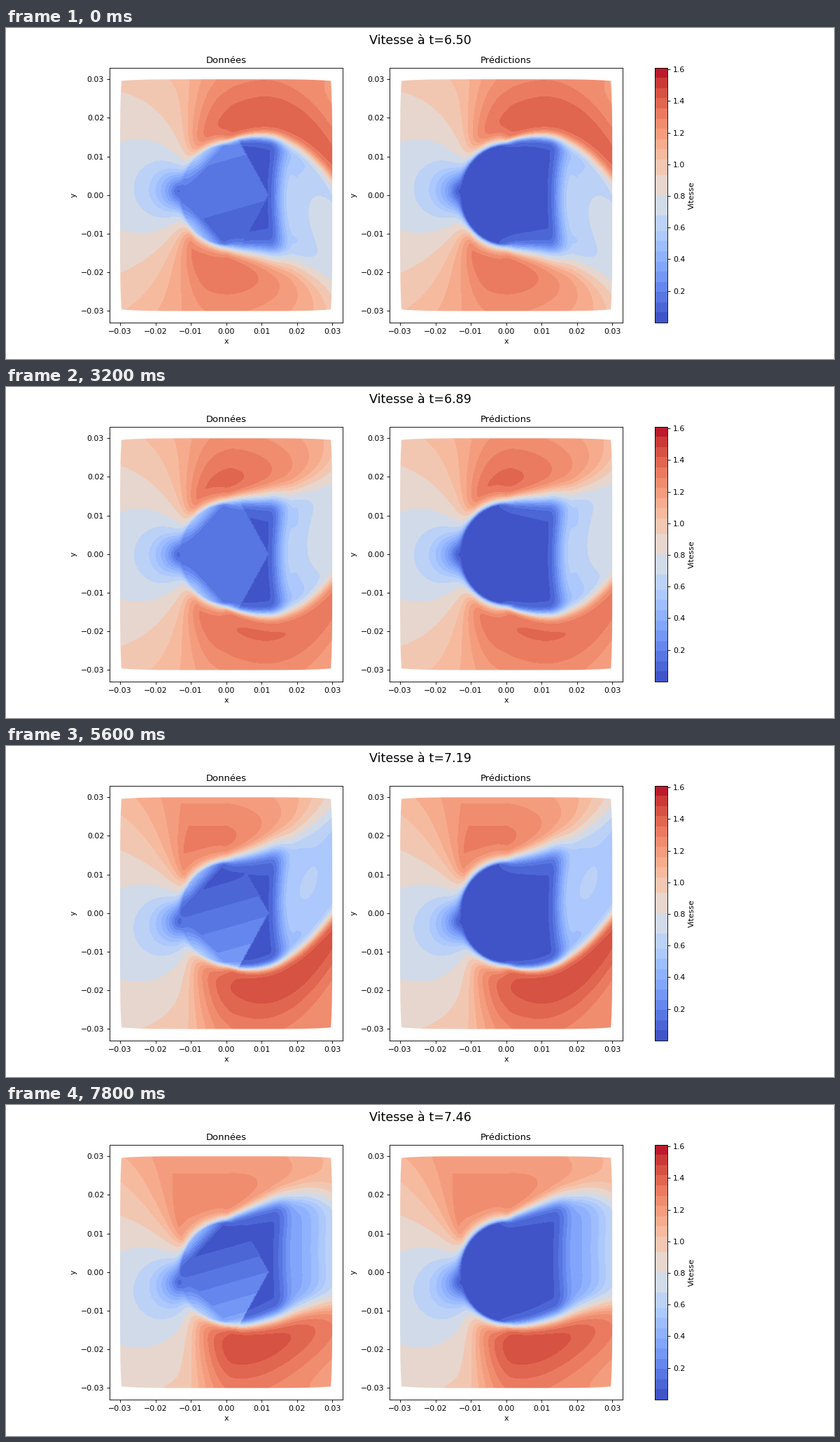
These frames come from a looping animation (1183 px wide and 473 px high, 8000 ms). A matplotlib script:

```python
import numpy as np
import matplotlib.pyplot as plt
from matplotlib.animation import FuncAnimation
from matplotlib.colors import BoundaryNorm, ListedColormap
from matplotlib.path import Path

FRAMES, INTERVAL = 40, 200
OMEGA = 0.996            # shedding phase advance per frame
T0, DT = 6.50, 0.02462   # displayed time
V_MAX = 1.61
RADIUS = 1.28            # cylinder radius, lengths in cm

plt.rcParams.update({"font.family": "DejaVu Sans", "font.size": 9.86})

axis = np.linspace(-3.02, 3.02, 203)
X, Y = np.meshgrid(axis, axis)
R = np.maximum(np.hypot(X, Y), 1e-6)
Z = (X + 1j * Y) * np.maximum(R, 1.2) / R
Z[np.abs(Z) < 1] = 1.2
DOWN = np.clip(axis, 0, 3.02)    # distance downstream


def smooth(s):
    s = np.clip(s, 0, 1)
    return s * s * (3 - 2 * s)


# Front of the body: thin boundary layer, or flat mesh chords under it.
layer = 1 - np.exp(-np.maximum(R - RADIUS, 0) / 0.12)
chord = (np.abs(Y) - X) / np.sqrt(2) - RADIUS / np.sqrt(2)
chord_layer = 1 - (1 - layer) * (1 - np.clip(chord, 0, 0.36) * 0.9)
polygon = X + 0.6 * np.abs(Y) < 1.2


def side(phi, height):
    """Edge of the wake, its thickness and the stream beyond, on one side.

    Each is a wave running downstream; the other side lags half a period.
    """
    x = DOWN
    edge = (1.38 + 0.22 * x - 0.08 * x ** 2
            + (0.13 * x + 0.115 * x ** 2) * np.cos(phi - 1.2 - 0.37 * x))
    peak = (1.36 - 0.018 * x ** 2
            + (0.11 + 0.055 * x) * np.cos(phi + 1.45 - 0.2 * x))
    thickness = (0.1 + 0.09 * x) * (1 + 0.4 * np.cos(phi - 2.6))
    away = np.abs(np.maximum(height - edge - 0.5, -0.5))
    stream = peak - 0.42 * np.maximum(peak - 1, 0) * smooth(away / 1.6)
    return edge, thickness, stream


def fields(frame):
    """Speed of the data and of the prediction."""
    phi = OMEGA * frame
    top, h_top, v_top = side(phi, Y)
    bottom, h_bottom, v_bottom = side(phi + np.pi, -Y)
    centre = (top - bottom) / 2
    half = np.maximum((top + bottom) / 2, 0.5)
    upper = Y > centre

    # potential flow with an oscillating circulation ahead of the body
    swing = np.sin(phi - 0.27)
    inflow = 0.9 + 0.01 * Y ** 2
    ahead = np.abs(inflow * (1 - 1.69 / Z ** 2) + 0.65j * swing / Z)
    beside = np.where(upper, v_top, v_bottom)
    mix = smooth((X + 1.4) / 1.6)
    outer = (1 - mix) * np.minimum(ahead, beside) + mix * beside

    # the wake recovers downstream and pulses twice per period
    eta2 = np.clip((Y - centre) / half, -0.8, 0.8) ** 2
    far = np.clip(X - 2, 0, 1)
    wake = (0.46 + 0.13 * far - 0.08 * eta2
            + (0.16 + 0.07 * far - 0.1 * eta2) * np.cos(2 * phi - far))
    start = 1.2 - 0.08 * np.cos(2 * phi) + 0.15 * eta2
    ramp = smooth((X - start) / 0.7)

    gap = np.where(upper, (Y - top) / h_top, (-bottom - Y) / h_bottom)
    shear = 0.5 * (1 + np.tanh(gap))
    behind = smooth((X + 0.3) / 0.6)

    def compose(body, front):
        inner = body + (wake - body) * ramp
        share = (1 - behind) * front + behind * shear
        return np.clip(inner + (outer - inner) * share, 0.002, V_MAX - 0.002)

    facets = 0.15 - 0.19 * swing * (0.95 * Y - 0.25 * X)
    facets = np.where(polygon, np.clip(facets, 0.05, 0.4), 0.055)
    return compose(facets, chord_layer), compose(0.055, layer)


# Colour bands: wide around the middle, narrow at the ends.
steps = [*range(0, 19, 2), 21, 25, 29, *range(32, 51, 2)]
levels = np.array(steps) * V_MAX / 50
shades = plt.get_cmap("coolwarm")((levels[:-1] + levels[1:]) / 2 / V_MAX)
cmap = ListedColormap(shades)
norm = BoundaryNorm(levels, cmap.N)

# Slightly barrel-shaped domain: one bulged side, turned four times.
s = np.linspace(-1, 1, 31)
edge_line = 2.96 * s + 1j * (3 - 0.04 * s ** 6)
border = np.concatenate([edge_line * (-1j) ** k for k in range(4)]) / 100
outline = Path(np.column_stack([border.real, border.imag]))

fig, axes = plt.subplots(1, 2, figsize=(1183 / 80, 473 / 80), dpi=80)
title = fig.suptitle("", fontsize=15.77)
ticks = np.arange(-3, 4) / 100
images = []
for ax, name in zip(axes, ("Données", "Prédictions")):
    image = ax.imshow(np.zeros_like(X), cmap=cmap, norm=norm, origin="lower",
                      extent=[-0.03035, 0.03035] * 2, aspect="auto",
                      interpolation="bilinear")
    image.set_clip_path(outline, ax.transData)
    ax.set(title=name, xlabel="x", ylabel="y", xticks=ticks, yticks=ticks,
           xlim=(-0.033, 0.033), ylim=(-0.033, 0.033))
    images.append(image)

bar = fig.colorbar(images[0], ax=axes, spacing="proportional", format="%.1f",
                   ticks=np.arange(1, 9) * 0.2)
bar.minorticks_off()
bar.set_label("Vitesse")


def update(frame):
    title.set_text(f"Vitesse à t={T0 + DT * frame:.2f}")
    for image, field in zip(images, fields(frame)):
        image.set_data(field)
    return [title, *images]


anim = FuncAnimation(fig, update, frames=FRAMES, interval=INTERVAL,
                     init_func=lambda: update(0), repeat=True, repeat_delay=0)
plt.show()
```
